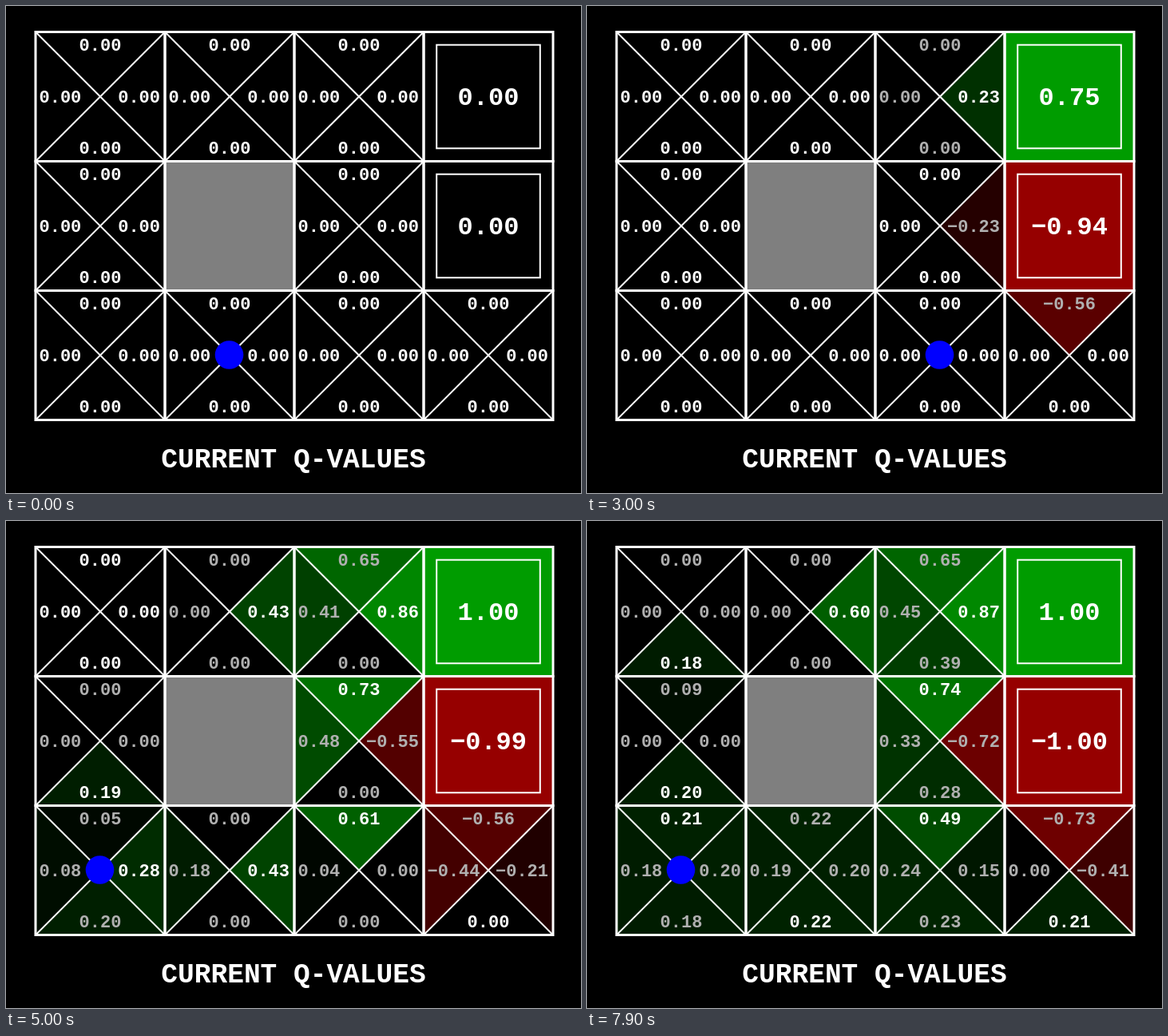
An HTML page that plays this animation: 720 by 610 pixels, repeating every 8000 ms.

```html
<!DOCTYPE html>
<html lang="en">
<head>
<meta charset="utf-8">
<title>Current Q-values</title>
<style>
  html, body { margin: 0; width: 100%; height: 100%; overflow: hidden; background: #000; }
  svg { display: block; }
  text { font: bold 22px "Liberation Mono", "Courier New", monospace; fill: #fff; text-anchor: middle; }
  text.start { text-anchor: start; }
  text.end { text-anchor: end; }
  text.big { font-size: 32px; }
  text.title { font-size: 34.5px; }
  text.muted { fill: #b0b0b0; }
  .line { fill: none; stroke: #fff; stroke-width: 2; }
  .edge { stroke-width: 3; }
</style>
</head>
<body>
<svg id="stage" width="720" height="610" viewBox="0 0 720 610"></svg>
<script>
const STEP = 100, FRAMES = 80, SIZE = 162, LEFT = 37, TOP = 32.5;
const CELLS = "abcdefghijkl", WALL = "f", GOAL = "d", PIT = "h";

// One cell per tick; a dot means the agent is off the board.
const PATH =
  "jklh.ijieabcghik" +
  "cdiklh.jgcdilh" +
  "klhikgcdjbcg" +
  "cijkgcei" +
  "ieijklhgci" +
  "jkgcdijieabcdiklgje" +
  "i";

// Learned values reached at the end of each stage, and exits counted so far.
const STAGES = [
  { at: 0, goal: 0, pit: 0, q: "" },
  { at: 16, goal: 0, pit: 2, q: "gE-.23" },
  { at: 30, goal: 2, pit: 4, q: "cE.23 lN-.56" },
  { at: 42, goal: 6, pit: 7, q: "cW.09 cE.80 bE.43 gN.61 gE-.55 iE.06 jE.09 kN.27 kW.04 lW-.44 lE-.21" },
  { at: 50, goal: 8, pit: 7, q: "cN.65 cW.41 cE.86 gN.73 gW.48 kN.61 eS.19 iN.05 iW.08 iE.28 iS.20 jW.18 jE.43" },
  { at: 60, goal: 10, pit: 9, q: "cW.51 cE.88 cS.26 gN.35 gW.47 gE-.72 gS.24 eS.25 iN.11 iW.17 iE.37 jS.31 " +
      "kN.33 kW.36 kE.10 kS.20 lN-.73 lW0 lE.07 lS.17" },
  { at: 79, goal: 14, pit: 11, q: "aS.18 bE.60 cW.45 cE.87 cS.39 eN.09 eS.20 gN.74 gW.33 gS.28 " +
      "iN.21 iW.18 iE.20 iS.18 jN.216 jE.20 jW.19 jS.221 kN.49 kW.24 kE.15 kS.23 lE-.41 lS.21" }
];

let known = {};
for (const stage of STAGES) {
  known = { ...known };
  for (const [, key, value] of stage.q.matchAll(/([a-l][NESW])(\S+)/g)) known[key] = +value;
  stage.values = known;
}

const svg = document.getElementById("stage");

function add(tag, attrs, content) {
  const node = document.createElementNS("http://www.w3.org/2000/svg", tag);
  for (const name in attrs) node.setAttribute(name, attrs[name]);
  if (content) node.textContent = content;
  return svg.appendChild(node);
}

function corner(cell) {
  const i = CELLS.indexOf(cell);
  return [LEFT + (i % 4) * SIZE, TOP + Math.floor(i / 4) * SIZE];
}

const isExit = cell => cell === GOAL || cell === PIT;
const parts = [];

function addPart(cell, dir, shape, cls, x, y) {
  parts.push({ cell, dir, shape, cls, x, y });
}

for (const cell of CELLS) {
  const [x, y] = corner(cell), r = x + SIZE, b = y + SIZE;
  const mid = `${x + SIZE / 2},${y + SIZE / 2}`;
  if (cell === WALL) {
    add("rect", { x, y, width: SIZE, height: SIZE, fill: "#7f7f7f" });
  } else if (isExit(cell)) {
    const shape = add("rect", { x, y, width: SIZE, height: SIZE });
    const inner = SIZE * 0.8, inset = (SIZE - inner) / 2;
    add("rect", { x: x + inset, y: y + inset, width: inner, height: inner, class: "line" });
    addPart(cell, "", shape, "big", x + 81, y + 91);
  } else {
    const tri = (p, q) => add("polygon", { points: `${p} ${q} ${mid}` });
    const nw = `${x},${y}`, ne = `${r},${y}`, se = `${r},${b}`, sw = `${x},${b}`;
    addPart(cell, "N", tri(nw, ne), "", x + 81, y + 23);
    addPart(cell, "E", tri(ne, se), "end", x + 156, y + 88);
    addPart(cell, "S", tri(se, sw), "", x + 81, y + 152);
    addPart(cell, "W", tri(sw, nw), "start", x + 4.5, y + 88);
    add("path", { d: `M${nw}L${se}M${ne}L${sw}`, class: "line" });
  }
}

for (const cell of CELLS) {
  const [x, y] = corner(cell);
  add("rect", { x, y, width: SIZE, height: SIZE, class: "line edge" });
}
for (const part of parts) part.label = add("text", { x: part.x, y: part.y, class: part.cls });
add("text", { x: 360, y: 578, class: "title" }, "CURRENT Q-VALUES");
const agent = add("circle", { r: 17.8, fill: "#00f" });

function visits(cell, from, to) {
  return PATH.slice(from, to).split(cell).length - 1;
}

// Values move whenever the agent has just left their cell.
function valueAt({ cell, dir }, tick, now, next) {
  if (isExit(cell)) {
    const name = cell === GOAL ? "goal" : "pit";
    const part = (tick - now.at) / (next.at - now.at || 1);
    const exits = Math.round(now[name] + (next[name] - now[name]) * part);
    return (cell === GOAL ? 1 : -1) * (1 - 0.5 ** exits);
  }
  const from = now.values[cell + dir] || 0, to = next.values[cell + dir] || 0;
  const total = visits(cell, now.at, next.at);
  return total ? from + (to - from) * visits(cell, now.at, tick) / total : from;
}

function format(value) {
  const digits = Math.abs(value).toFixed(2);
  return (value < 0 && digits !== "0.00" ? "\u2212" : "") + digits;
}

function render(tick) {
  const i = STAGES.findLastIndex(stage => stage.at <= tick);
  const now = STAGES[i], next = STAGES[i + 1] || now;
  const values = parts.map(part => valueAt(part, tick, now, next));
  const high = Math.max(...values), low = Math.min(...values);
  const best = {};
  parts.forEach(({ cell }, n) => best[cell] = Math.max(best[cell] ?? -2, values[n]));

  parts.forEach((part, n) => {
    const value = values[n];
    const red = value < 0 ? Math.round(150 * value / low) : 0;
    const green = value > 0 ? Math.round(156 * value / high) : 0;
    part.shape.setAttribute("fill", `rgb(${red},${green},0)`);
    part.label.textContent = format(value);
    part.label.classList.toggle("muted", value < best[part.cell]);
  });

  const here = PATH[tick];
  agent.setAttribute("visibility", here === "." ? "hidden" : "visible");
  if (here !== ".") {
    const [x, y] = corner(here);
    agent.setAttribute("cx", x + 80.5);
    agent.setAttribute("cy", y + 80.5);
  }
}

let shown = -1;
const start = performance.now();
function loop() {
  const tick = Math.floor((performance.now() - start) / STEP) % FRAMES;
  if (tick !== shown) render(shown = tick);
  requestAnimationFrame(loop);
}
loop();
</script>
</body>
</html>
```
